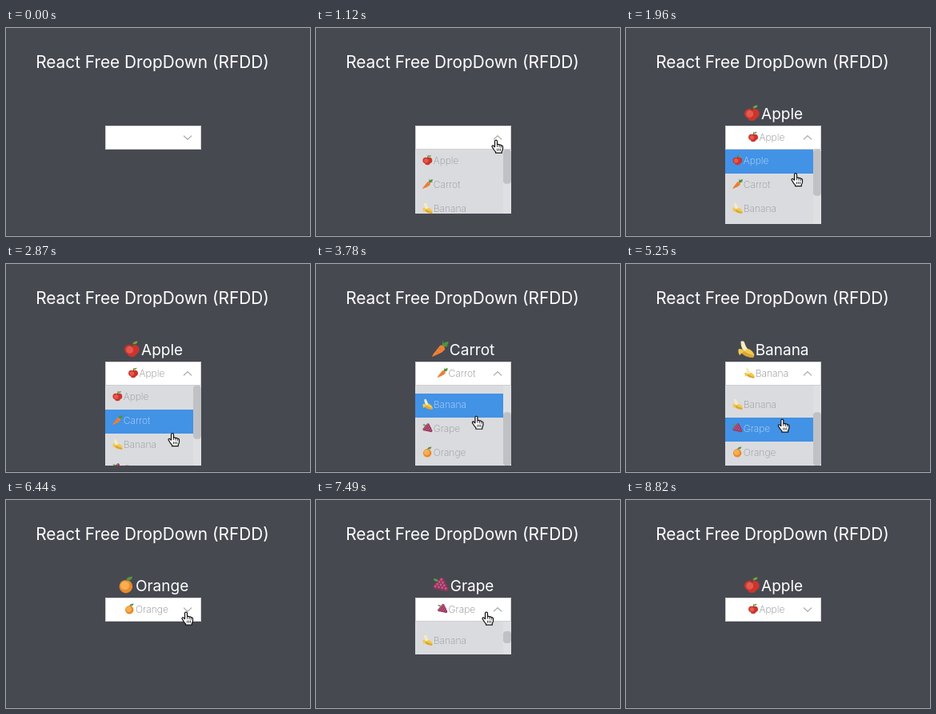
An HTML page with a canvas for the animation above (8960 ms loop, 380 px wide and 260 px high).

```html
<!DOCTYPE html>
<html lang="en">
<head>
<meta charset="utf-8">
<title>Dropdown demo</title>
<style>
  html, body { margin: 0; width: 100%; height: 100%; overflow: hidden; background: #474951; }
  canvas { display: block; }
</style>
</head>
<body>
<canvas id="stage" width="380" height="260"></canvas>
<script>
const ctx = document.getElementById('stage').getContext('2d');
const LOOP = 8960, STEP = 70, FADE = 300;
const BOX = { x: 124, y: 122, w: 120, h: 30 };
const LIST = { y: 152, h: 100, row: 30, bar: 10 };
const ITEMS = ['Apple', 'Carrot', 'Banana', 'Grape', 'Orange'];
const CONTENT = ITEMS.length * LIST.row;

// The menu opens, then an item is picked; headX and rowX are where the pointer clicks
const SESSIONS = [
  { open: 970, pick: 1936, item: 'Apple', headX: 225, rowX: 212 },
  { open: 2450, pick: 3010, item: 'Carrot', headX: 215, rowX: 208 },
  { open: 3360, pick: 3990, item: 'Banana', headX: 215, rowX: 200 },
  { open: 4870, pick: 5670, item: 'Orange', headX: 205, rowX: 185 },
  { open: 6580, pick: 7050, item: 'Grape', headX: 225, rowX: 205 },
  { open: 7415, pick: 8380, item: 'Apple', headX: 213, rowX: 210 }
];

const clamp = p => Math.min(1, Math.max(0, p));
const smooth = p => p * p * (3 - 2 * p);
const ramp = (t, from, to) => smooth(clamp((t - from) / (to - from)));

// CSS "ease" curve, solved by bisection
function ease(p) {
  p = clamp(p);
  let lo = 0, hi = 1, s;
  for (let i = 0; i < 20; i++) {
    s = (lo + hi) / 2;
    if (.75 * s * (1 - s) + s ** 3 < p) lo = s; else hi = s;
  }
  return .3 * s * (1 - s) ** 2 + 3 * s * s * (1 - s) + s ** 3;
}

const scrollAt = t => (CONTENT - LIST.h) * (ramp(t, 3500, 3700) - ramp(t, 7800, 8050));

function menuAt(t) {
  const menu = { picked: '', height: 0, up: false };
  for (const { open, pick, item } of SESSIONS) {
    if (t < open) break;
    const shown = t < pick ? ease((t - open) / FADE) : 1 - ease((t - pick) / FADE);
    menu.height = Math.round(LIST.h * shown);
    menu.up = t < pick + 100;
    if (t >= pick) menu.picked = item;
  }
  return menu;
}

// The pointer rests at every click and glides in between
const STOPS = [{ arrive: 0, leave: 0, x: 384, y: 268 }];
for (const { open, pick, item, headX, rowX } of SESSIONS) {
  const rowY = LIST.y + (ITEMS.indexOf(item) + .95) * LIST.row - scrollAt(pick);
  STOPS.push({ arrive: open - 150, leave: open + 150, x: headX, y: 139 });
  STOPS.push({ arrive: pick - 180, leave: pick + 60, x: rowX, y: rowY });
}
STOPS.push({ arrive: 8800, leave: LOOP, x: 384, y: 268 });

function pointerAt(t) {
  const i = STOPS.findIndex(stop => t <= stop.leave);
  const to = STOPS[i], from = STOPS[i - 1] || to;
  const k = i ? ramp(t, from.leave, to.arrive) : 1;
  return { x: from.x + (to.x - from.x) * k, y: from.y + (to.y - from.y) * k };
}

// Icons sit in a 16 unit square around the origin
const disc = (x, y, r) => `M${x - r} ${y}a${r} ${r} 0 1 0 ${2 * r} 0a${r} ${r} 0 1 0 ${-2 * r} 0z`;
const leaf = (x, y, dx, dy) => `M${x} ${y}q0 ${dy} ${dx} ${dy}q0 ${-dy} ${-dx} ${-dy}z`;

// Triangular cluster that narrows towards the lower right
function cluster(r, shift) {
  let d = '';
  for (let row = 0; row < 4; row++) {
    for (let c = 0; c < 4 - row; c++) {
      const across = (c - (3 - row) / 2) * 2.7, along = row * 2.9 - 2.5;
      d += disc(along * .8 + across * .7 - shift, along * .6 - across * .8 - shift, r);
    }
  }
  return d;
}

const ICONS = {
  Apple: [
    ['#cb352d', disc(-2.6, .6, 4.6) + disc(2.6, .6, 4.6) + disc(0, 3, 4.6)],
    ['#e5594a', disc(-2, .8, 3.4)],
    ['#7b3f2a', 'M-.6-2L.5-7L1.700-7L.5-2z'],
    ['#6da544', leaf(1, -4.5, 4.5, -3)]
  ],
  Carrot: [
    ['#4d9440', leaf(2, -2, 1, -6) + leaf(2, -2, 6, -5) + leaf(2, -2, 6, -1)],
    ['#ee8136', 'M0-3.500Q4-4 4.500 0Q4 2 0 4L-7.500 7.500Q-8 7-6 4z'],
    ['#cf6128', 'M-2-1L1 .5L.5 1zM-4 2L-1.500 3.500L-2 4z']
  ],
  Banana: [
    ['#f8ebbd', 'M-5-7Q-2-9-1-5Q0-1 4 2L1 5Q-5 1-5-7z'],
    ['#f2c94c', 'M-7 0Q-4-1-2 2Q0 0 3 0Q7 2 8 6L7 8Q0 8-4 4L-6 6Q-8 3-7 0z'],
    ['#dba636', 'M-2 2Q2 5 7 6L7 8Q0 8-4 4z']
  ],
  Grape: [
    ['#5f9a43', leaf(-2, -3, -5, -3)],
    ['#94355c', cluster(2.4, 0)],
    ['#c05f87', cluster(1.1, .4)]
  ],
  Orange: [
    ['#e98a2b', disc(-.3, 1.5, 6.3)],
    ['#f8ae50', disc(-1.2, .5, 4.2)],
    ['#569245', leaf(0, -4, 6, -4)]
  ]
};
for (const name in ICONS) ICONS[name] = ICONS[name].map(([color, d]) => [color, new Path2D(d)]);

const HAND = new Path2D('M-1.500 9V2q0-1.500 1.500-1.500t1.500 1.500V6q1.500-1 2.500 .5q1.500-1 2.300 .5' +
  'q2.200 0 2.200 2v2q0 2-1.200 3.500v2H-.5V15Q-2.500 13-3.500 11L-5 8.800Q-5 7-3.500 7.200z');
const KNUCKLES = new Path2D('M1.500 6V9M4 6.500v3M6.300 7v3M1.500 11v3M3.500 11v3M5.500 11v3');

function rect(x, y, w, h, color) {
  ctx.fillStyle = color;
  ctx.fillRect(x, y, w, h);
}

function setFont(size, weight, color) {
  ctx.font = `${weight} ${size}px Inter, sans-serif`;
  ctx.fillStyle = color;
}

function icon(name, x, y, size) {
  ctx.save();
  ctx.translate(x, y);
  ctx.scale(size / 16, size / 16);
  for (const [color, path] of ICONS[name]) {
    ctx.fillStyle = color;
    ctx.fill(path);
  }
  ctx.restore();
}

function entry(name, x, y, size, weight, color, centered) {
  const cell = size * 1.23;
  setFont(size, weight, color);
  if (centered) x -= (cell + ctx.measureText(name).width) / 2;
  ctx.fillText(name, x + cell, y);
  icon(name, x + cell / 2, y - size * .41, size * 1.1);
}

function list(height, scroll, pointer) {
  const width = BOX.w - LIST.bar, barX = BOX.x + width;
  const inside = pointer.x >= BOX.x && pointer.x < barX && pointer.y >= LIST.y;
  ctx.save();
  ctx.beginPath();
  ctx.rect(BOX.x, LIST.y, BOX.w, height);
  ctx.clip();
  rect(BOX.x, LIST.y, BOX.w, LIST.h, '#dadbde');
  ITEMS.forEach((name, i) => {
    const y = LIST.y + i * LIST.row - scroll;
    const hover = inside && pointer.y >= y && pointer.y < y + LIST.row;
    if (hover) rect(BOX.x, y, width, LIST.row, '#4292e6');
    entry(name, BOX.x + 8, y + 18, 12, 200, hover ? '#c3dcf6' : '#95979b');
  });
  rect(barX, LIST.y, LIST.bar, LIST.h, '#dfe0e2');
  const thumb = Math.max(15, height * height / CONTENT);
  const offset = Math.max(0, height - thumb) * scroll / (CONTENT - height);
  ctx.fillStyle = '#c0c1c4';
  ctx.beginPath();
  ctx.roundRect(barX, LIST.y + offset, LIST.bar, thumb, 4);
  ctx.fill();
  ctx.restore();
}

function chevron(up) {
  const dir = up ? -1 : 1;
  ctx.strokeStyle = '#797a7e';
  ctx.lineWidth = 1;
  ctx.beginPath();
  ctx.moveTo(222, 137 - 2.4 * dir);
  ctx.lineTo(227, 137 + 2.4 * dir);
  ctx.lineTo(232, 137 - 2.4 * dir);
  ctx.stroke();
}

function hand({ x, y }) {
  ctx.save();
  ctx.translate(x, y + .7);
  ctx.lineJoin = 'round';
  ctx.lineWidth = 1.2;
  ctx.fillStyle = '#fff';
  ctx.strokeStyle = '#111';
  ctx.fill(HAND);
  ctx.stroke(HAND);
  ctx.lineWidth = .8;
  ctx.stroke(KNUCKLES);
  ctx.restore();
}

function draw(t) {
  const { picked, height, up } = menuAt(t);
  const pointer = pointerAt(t);
  rect(0, 0, 380, 260, '#474951');
  rect(0, 259, 380, 1, '#3d3e45');
  setFont(20.8, 400, '#fff');
  ctx.textAlign = 'center';
  ctx.fillText('React Free DropDown (RFDD)', 183, 50);
  ctx.textAlign = 'left';
  if (picked) entry(picked, 183.4, 114, 19, 400, '#fff', true);
  if (height) list(height, scrollAt(t), pointer);
  rect(BOX.x, BOX.y, BOX.w, BOX.h, '#cfd0d2');
  rect(BOX.x + 1, BOX.y + 1, BOX.w - 2, BOX.h - 2, '#fff');
  if (picked) entry(picked, 175, 141, 12.1, 200, '#85868a', true);
  chevron(up);
  hand(pointer);
}

const start = performance.now();
function frame() {
  const t = (performance.now() - start) % LOOP;
  draw(Math.floor(t / STEP) * STEP);
  requestAnimationFrame(frame);
}
frame();
</script>
</body>
</html>
```
